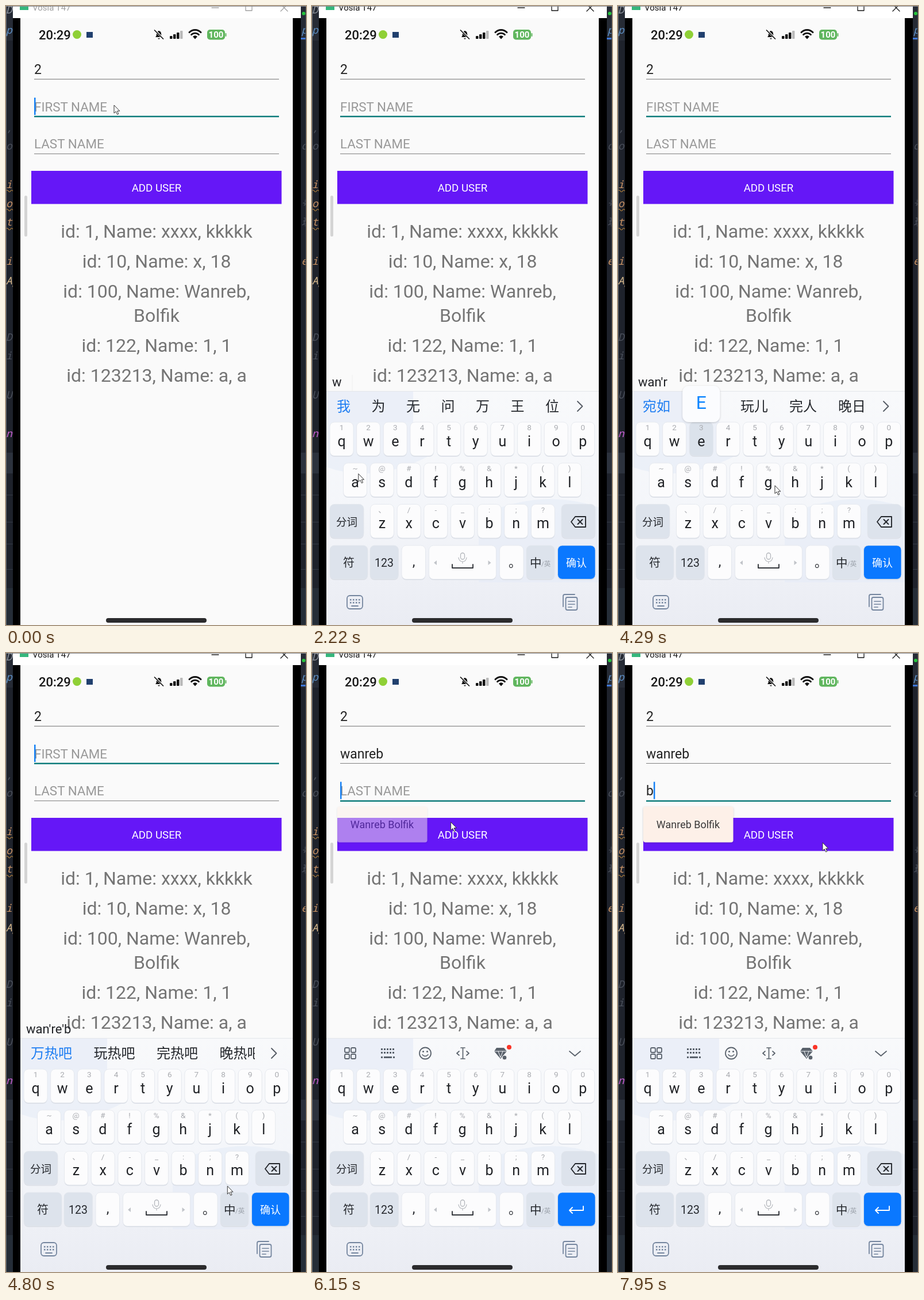
Recreate the animation shown at these times as an HTML page. Size 522 by 1074 pixels, loop 8000 ms.

```html
<!DOCTYPE html>
<html lang="en">
<head>
<meta charset="utf-8">
<title>Add user form</title>
<style>
html, body { margin: 0; width: 100%; height: 100%; overflow: hidden; background: #1e222b; }
svg { display: block; width: 100vw; height: 100vh; }
text { font-family: Roboto, "Noto Sans CJK SC", "Noto Sans CJK", sans-serif; white-space: pre; }
.code { font: italic 18px "Noto Sans Mono", monospace; }
.mid { text-anchor: middle; }
.line { fill: none; stroke-linecap: round; stroke-linejoin: round; }
</style>
</head>
<body>
<svg id="stage" viewBox="0 0 522 1074" xmlns="http://www.w3.org/2000/svg"></svg>
<script>
const LOOP = 8000;
const FIRST = 'Wanreb', LAST = 'Bolfik';

// ---------- drawing helpers ----------
const rect = (x, y, w, h, fill, more = '') =>
  `<rect x="${x}" y="${y}" width="${w}" height="${h}" fill="${fill}" ${more}/>`;
const text = (x, y, size, fill, str, more = '') =>
  `<text x="${x}" y="${y}" font-size="${size}" fill="${fill}" ${more}>${str}</text>`;
const mid = (x, y, size, fill, str, more = '') => text(x, y, size, fill, str, `class="mid" ${more}`);
const path = (d, stroke, w, more = '') =>
  `<path class="line" d="${d}" stroke="${stroke}" stroke-width="${w}" ${more}/>`;
const shape = (d, fill, more = '') => `<path d="${d}" fill="${fill}" ${more}/>`;
const dot = (x, y, r, fill, more = '') => `<circle cx="${x}" cy="${y}" r="${r}" fill="${fill}" ${more}/>`;
const group = (id, body, more = '') => `<g id="${id}" ${more}>${body}</g>`;

// ---------- editor behind the phone window ----------
function editor() {
  const gray = '#4b505b', orange = '#c99264';
  const left = [[13, 'D', '#8d939d'], [48, 'p', '#5d8fc4'], [218, ',', gray], [249, 'oi', gray],
    [316, 'ie', orange], [349, 'or', orange], [381, 'ts', orange], [449, 'ie', orange], [483, 'Ap', '#d7b98c'],
    [581, 'D', gray], [613, 'i)', gray], [681, 'Us', gray], [748, 'n', '#c65fd0']];
  const right = [[48, 'p', '#5d8fc4'], [249, 'oi', gray], [349, '号', gray], [381, '理', gray], [449, 'en', orange]];
  const wave = y => path(`M0 ${y}q2-3 4 0t4 0 4 0`, '#c08a3e', 1.2);
  return rect(0, 0, 522, 1074, '#1e222b') + rect(0, 0, 522, 60, '#262b35') +
    rect(0, 775, 522, 36, '#2c323d') + rect(0, 1010, 522, 64, '#252d37') +
    [848, 895, 933, 977].map(y => rect(0, y, 522, 1, '#343a45')).join('') +
    left.map(([y, s, c]) => text(0, y, 18, c, s, 'class="code"')).join('') +
    right.map(([y, s, c]) => text(514, y, 18, c, s, 'class="code"')).join('') +
    [321, 354, 387].map(wave).join('') +
    rect(513, 55, 9, 3, '#3f78d8') + dot(518, 13, 3, '#25c43c') +
    rect(0, 0, 1, 1074, '#666b73') + rect(521, 0, 1, 1074, '#3a3f48');
}

function titleBar() {
  return rect(12, 0, 501, 21, '#fff') + rect(24, 0, 15, 7, '#35b77c') +
    group('title', text(46, 7.5, 15, 'currentColor', 'Vosla T47') +
      path('M358 3h12M417 0v8h11V0M478 9l12-12M490 9l-12-12', 'currentColor', 1.3)) +
    rect(0, 0, 522, 1, '#8a8d92');
}

// ---------- phone screen ----------
function statusBar() {
  const bars = [5, 8, 11, 14].map((h, i) =>
    rect(285 + i * 6, 57 - h, 4.5, h, i < 3 ? '#111' : '#b9b9b9', 'rx="1"')).join('');
  const arc = (r, w) => path(`M${329 - r * .72} ${57 - r * .8}a${r} ${r} 0 0 1 ${r * 1.44} 0`, '#111', w);
  return text(57, 57.5, 22, '#161616', '20:29', 'font-weight="500"') +
    dot(123.5, 49.5, 7.5, '#8fd036') + rect(140, 45, 11, 10, '#21406e') +
    shape('M260 54q2-2 2-6 0-4 4-5 4 1 4 5 0 4 2 6zM264 56h4q-2 3-4 0z', '#111') +
    path('M259 42l15 15', '#fafafa', 3.4) + path('M258.500 42l15 15', '#111', 1.7) +
    bars + arc(14, 2.8) + arc(9, 2.8) + shape('M325 53q4-3.500 8 0l-4 4.500z', '#111') +
    rect(350, 41, 31, 17.500, '#60b65e', 'rx="5"') + rect(381.500, 47, 2, 6, '#60b65e', 'rx="1"') +
    mid(365.500, 55, 15, '#fff', '100', 'font-weight="700"');
}

function form() {
  const rows = [[402, 'id: 1, Name: xxxx, kkkkk'], [454, 'id: 10, Name: x, 18'],
    [506, `id: 100, Name: ${FIRST},`], [548, LAST], [600, 'id: 122, Name: 1, 1'], [652, 'id: 123213, Name: a, a']];
  return text(49, 118, 23, '#222', '2') + rect(49, 126.500, 426, 1, '#6e6e6e') +
    text(49, 182.500, 22.4, '#999', '', 'id="first"') + rect(49, 191, 426, 1, '#777', 'id="line1"') +
    text(49, 247, 22.4, '#999', '', 'id="last"') + rect(49, 256, 426, 1, '#888', 'id="line2"') +
    rect(49, 159, 2.500, 30, '#1480f5', 'id="caret"') +
    rect(44, 286, 435.500, 57.500, '#6517f7') + mid(262, 321.500, 18.700, '#fff', 'ADD USER') +
    rows.map(([y, s]) => mid(262, y, 32, '#757575', s)).join('') +
    rect(32, 329, 5, 71, '#d4d4d4', 'rx="2.500"') +
    group('fill', rect(44, 202, 156.500, 62, '#fdf0e8', 'rx="4" filter="url(#soft)"') +
      mid(122, 239, 18, '#3a3a3a', `${FIRST} ${LAST}`));
}

// ---------- keyboard ----------
const PITCH = 46.65;
const ROWS = [
  { x: 51.5, y: 722, keys: 'qwertyuiop', hints: '1234567890' },
  { x: 75, y: 793, keys: 'asdfghjkl', hints: '~@#!%&*()' },
  { x: 122, y: 864.5, keys: 'zxcvbnm', hints: '、/-_:;?' }
];
const keyAt = {};
ROWS.forEach(r => [...r.keys].forEach((k, i) => keyAt[k] = { x: r.x + i * PITCH, y: r.y }));

const cap = (x, y, w, fill, more = '') =>
  rect(x, y + 1, w, 59, '#d9dde5', 'rx="8"') +
  rect(x, y, w, 58.5, fill, `rx="8" stroke="#e3e6ec" stroke-width=".8" ${more}`);

function letters() {
  return ROWS.map(r => [...r.keys].map((k, i) => {
    const x = r.x + i * PITCH;
    return cap(x - 20.5, r.y, 41, '#fcfcfd', `id="key-${k}"`) +
      mid(x, r.y + 14, 13.5, '#a9abb0', r.hints[i].replace('&', '&amp;')) +
      mid(x, r.y + 41.5, 25, '#202226', k);
  }).join('')).join('');
}

function toolbar() {
  const c = '#5a626c';
  const squares = [[57, 685], [68, 685], [57, 696], [68, 696]].map(([x, y]) =>
    rect(x, y, 8, 8, 'none', `rx="2" stroke="${c}" stroke-width="1.800"`)).join('');
  let dots = rect(125, 700, 14, 3, c);
  for (let i = 0; i < 10; i++) dots += rect(120 + i % 5 * 5, 686 + (i > 4) * 6, 3, 3, c);
  dots += rect(120, 700, 3, 3, c) + rect(141, 700, 3, 3, c);
  return squares + dots +
    dot(197, 694.5, 10, 'none', `stroke="${c}" stroke-width="1.800"`) +
    dot(193.5, 691.5, 1.5, c) + dot(200.5, 691.5, 1.5, c) + path('M192 697q5 5 10 0', c, 1.7) +
    path('M259 685h7M259 704h7M262.500 685v19M256 691l-4 3.500 4 3.500M269 691l4 3.500-4 3.500', c, 1.7) +
    shape('M321 685h13l5 6-11 13-11-13z', c) + path('M317 691h22M324 691l4 11 4-11', '#f2f4f8', 1) +
    dot(335, 702, 4, c, 'stroke="#f5f6f9"') + dot(343, 684, 4, '#fa3427') +
    path('M448 691l9.500 8 9.500-8', c, 1.8);
}

function bottomRow() {
  const dim = '#dde3ec', ink = '#25282d';
  return cap(31, 864.5, 59, dim) + mid(60.5, 902, 18.5, ink, '分词') +
    cap(434, 864.5, 59, dim) + path('M458 886h18v18h-18l-7-9zM462.500 891l8 8M470.500 891l-8 8', ink, 1.9) +
    cap(31, 936, 66, dim) + mid(64, 973, 20, ink, '符') +
    cap(101, 936, 49.5, dim) + mid(125.5, 973, 19.5, ink, '123') +
    cap(156, 936, 41.5, '#fcfcfd') + mid(177, 972, 24, ink, ',') +
    cap(203.5, 936, 117, '#fcfcfd') +
    rect(258.500, 949, 7, 11, 'none', 'rx="3.500" stroke="#b4b7bc" stroke-width="1.300"') +
    path('M255 957q1 7 7 7t7-7M262 964v3', '#b4b7bc', 1.2) +
    path('M244 969v6h36v-6', '#33363b', 1.9) +
    shape('M217 962v8l-5-4zM306.500 962v8l5-4z', '#c1c4c9') +
    cap(326.5, 936, 41.5, '#fcfcfd') + text(342, 973, 22, ink, '。') +
    cap(373, 936, 49, dim) + text(379, 974, 20.5, ink, '中') + text(399, 972, 11.5, '#9ba1aa', '/英') +
    cap(427.5, 936, 65.5, '#0a78ff') + shape('M427.500 985L493 938v50q0 6-8 6.500h-50q-7 0-7.500-7z', '#077', 'opacity="0"') +
    path('M472 960v7h-24M453 962l-5 5 5 5', '#fff', 1.9, 'id="enter"') +
    mid(460, 973, 18, '#fff', '确认', 'id="confirm"');
}

function footer() {
  const c = '#75869f';
  let body = rect(61, 1023, 27, 23, 'none', `rx="5" stroke="${c}" stroke-width="1.800"`);
  for (let i = 0; i < 8; i++) body += rect(66 + i % 4 * 5, 1029 + (i > 3) * 5, 2.5, 2.5, c);
  return body + path('M69 1041h11', c, 1.8) +
    path('M437 1042V1024q0-3 3-3h17', c, 1.8) +
    rect(441.500, 1026, 20, 22, 'none', `rx="3" stroke="${c}" stroke-width="1.800"`) +
    path('M446 1033h11M446 1038h11M446 1043h6', c, 1.7);
}

function keyboard() {
  return rect(25, 668, 474, 406, 'url(#board)') + rect(25, 668, 474, 1, '#e4e6ea') +
    rect(25, 669, 151, 53, '#ebeff8') +
    shape('M25 800Q110 830 205 780V722H25zM290 885Q400 835 499 870V1000H290z', '#e6edf8', 'opacity=".65"') +
    group('tools', toolbar()) +
    group('picks', '', 'clip-path="url(#strip)"') +
    path('M462 686l8.500 8.500-8.500 8.500', '#555b64', 1.8, 'id="more"') +
    letters() + bottomRow() + footer() +
    group('compose', rect(25, 638, 50, 30, '#fafafa', 'id="composeBox"') +
      rect(75, 640, 1, 28, '#eee', 'id="composeEdge"') + text(35, 660, 22, '#202226', '', 'id="composeText"')) +
    group('bubble', rect(-32.5, -63, 65, 63, '#fbfcfe', 'rx="11" filter="url(#soft)"') +
      mid(0, -23, 32, '#0a84ff', '', 'id="bubbleText"'));
}

document.getElementById('stage').innerHTML = `<defs>
  <linearGradient id="board" x1="0" y1="0" x2="0" y2="1">
    <stop offset="0" stop-color="#f8f9fb"/><stop offset=".5" stop-color="#f4f6fa"/><stop offset="1" stop-color="#eaecf3"/>
  </linearGradient>
  <filter id="soft" x="-20%" y="-20%" width="140%" height="150%">
    <feDropShadow dx="0" dy="1" stdDeviation="1.500" flood-color="#333" flood-opacity=".25"/>
  </filter>
  <clipPath id="strip"><rect x="25" y="669" width="408" height="52"/></clipPath>
  <clipPath id="screen"><rect x="25" y="21" width="474" height="1053"/></clipPath>
</defs>` + editor() + titleBar() + rect(12, 21, 501, 1053, '#000') +
  `<g clip-path="url(#screen)">${rect(25, 21, 474, 1053, '#fafafa')}${statusBar()}${form()}${group('board-all', keyboard())}
  ${rect(174, 1062, 175, 8, '#2b2b2d', 'rx="4"')}</g>` +
  group('mouse', shape('M0 0V14L3.200 11 5.600 16.200 7.800 15.200 5.500 10.200H9.800z', '#fff', 'stroke="#333" stroke-width="1"'));

const el = {};
document.querySelectorAll('#stage [id]').forEach(n => el[n.id] = n);

// ---------- timing ----------
// The screen refreshes in bursts: [start, end, steps].
const BURSTS = [[0, 0, 1], [120, 270, 2], [660, 1620, 8], [1770, 2760, 8], [2880, 3840, 8],
  [3990, 4920, 8], [5070, 6000, 8], [6150, 7080, 8], [7200, 7950, 7]];
const TICKS = BURSTS.flatMap(([a, b, n]) =>
  Array.from({ length: n }, (_, i) => a + (n > 1 ? i * (b - a) / (n - 1) : 0)));
const snap = t => TICKS.reduce((best, k) => k <= t + 20 ? k : best, 0);

const MOUSE = [[0, 188, 172], [800, 188, 172], [1208, 191, 369], [1700, 99, 752], [1900, 99, 752],
  [2300, 77, 824], [2500, 77, 824], [3017, 360, 881], [3250, 356, 888], [3540, 193, 752], [3700, 193, 752],
  [4000, 147, 752], [4123, 147, 752], [4256, 273, 832], [4500, 308, 888], [4650, 308, 888],
  [4920, 459, 960], [5070, 459, 960], [5336, 242, 370], [5680, 236, 236], [6000, 236, 236],
  [6815, 299, 880], [6947, 301, 904], [7150, 303, 902], [7450, 459, 960], [7575, 459, 960], [7950, 356, 329]];

const HOLD = 260;
const WORDS = [
  { end: 5060, keys: [
    [1760, 'w', 'w', '我 为 无 问 万 王 位'],
    [2340, 'a', 'wa', '挖 娃 哇 瓦 袜 蛙 洼'],
    [3140, 'n', 'wan', '万 玩 完 晚 碗 弯 湾'],
    [3540, 'r', "wan'r", '宛如 万人 玩儿 完人 晚日'],
    [4110, 'e', "wan're", '万热 玩热 完热 晚热 弯热'],
    [4500, 'b', "wan're'b", '万热吧 玩热吧 完热吧 晚热吧']] },
  { end: 7570, keys: [[7070, 'b', 'b', '不 把 被 吧 本 别 比']] }
];
const COMMIT1 = WORDS[0].end, COMMIT2 = WORDS[1].end, FOCUS2 = 5860;

const clamp = v => Math.min(1, Math.max(0, v));
const ease = p => p * p * (3 - 2 * p);
const show = (node, on) => node.setAttribute('visibility', on ? 'visible' : 'hidden');
const set = (node, attrs) => Object.entries(attrs).forEach(([k, v]) => node.setAttribute(k, v));

function mouseAt(t) {
  const i = Math.max(0, MOUSE.findLastIndex(p => p[0] <= t));
  const a = MOUSE[i], b = MOUSE[i + 1] || a;
  const p = b === a ? 0 : ease((t - a[0]) / (b[0] - a[0]));
  return [a[1] + (b[1] - a[1]) * p, a[2] + (b[2] - a[2]) * p];
}

function drawField(node, line, value, hint, focused, y) {
  node.textContent = value || hint;
  set(node, { fill: value ? '#222' : '#999', 'font-size': value ? 23 : 22.4 });
  set(line, focused ? { y: y - .5, height: 2.5, fill: '#0f7d7c' } : { y, height: 1, fill: '#808080' });
}

function drawFields(t) {
  const second = t >= FOCUS2;
  const name = t >= COMMIT1 ? FIRST.toLowerCase() : '';
  const last = t >= COMMIT2 ? 'b' : '';
  drawField(el.first, el.line1, name, 'FIRST NAME', !second, 191);
  drawField(el.last, el.line2, last, 'LAST NAME', second, 256);

  const base = [COMMIT2, FOCUS2, COMMIT1].find(b => t >= b) || 620;
  const field = second ? el.last : el.first;
  const typed = second ? last : name;
  set(el.caret, { x: 49 + (typed ? field.getComputedTextLength() : 0), y: second ? 223.5 : 159 });
  show(el.caret, (t - base + 1000) % 1000 < 500);

  const fade = second ? clamp((t - 6000) / 310) : clamp((t - 5070) / 310);
  set(el.fill, { opacity: fade, transform: `translate(0 ${second ? 64.5 : 0})` });
}

let lastPicks = null;
function drawKeys(t) {
  const word = WORDS.find(w => t < w.end && t >= w.keys[0][0]);
  const press = word && word.keys.find(([at]) => t >= at && t < at + HOLD);
  const step = word && word.keys.findLast(([at]) => t >= at + HOLD);

  Object.keys(keyAt).forEach(k => el['key-' + k].setAttribute('fill', press && press[1] === k ? '#dbe2eb' : '#fcfcfd'));
  show(el.bubble, press);
  if (press) {
    const { x, y } = keyAt[press[1]];
    set(el.bubble, { transform: `translate(${x} ${y})` });
    el.bubbleText.textContent = press[1].toUpperCase();
  }

  show(el.tools, !step);
  show(el.enter, !step);
  [el.confirm, el.more, el.picks, el.compose].forEach(n => show(n, step));
  const picks = step ? step[3] : '';
  if (picks !== lastPicks) {
    lastPicks = picks;
    const list = picks.split(' ');
    const gap = list[0].length * 24.5 + 36;
    el.picks.innerHTML = list.map((s, i) =>
      text(43 + i * gap, 703, 24, i ? '#24272c' : '#1d7df2', s)).join('');
  }
  if (step) {
    el.composeText.textContent = step[2];
    const w = el.composeText.getComputedTextLength() + 28;
    set(el.composeBox, { width: Math.min(w, 78) });
    set(el.composeEdge, { x: 25 + w });
    show(el.composeEdge, w < 78);
  } else show(el.composeEdge, false);
}

function draw(time) {
  const t = snap(time);
  el.title.style.color = t < 660 ? '#a0a0a0' : '#161616';
  const rise = ease(clamp((t - 700) / 380));
  set(el['board-all'], { transform: `translate(0 ${(1 - rise) * 406})` });
  show(el['board-all'], rise > 0);
  drawFields(t);
  drawKeys(t);
  // Nothing of the keyboard may stay visible before it rises.
  el['board-all'].style.display = rise > 0 ? '' : 'none';
  const [x, y] = mouseAt(t);
  set(el.mouse, { transform: `translate(${x} ${y})` });
}

const start = performance.now();
function tick() {
  draw((performance.now() - start) % LOOP);
  requestAnimationFrame(tick);
}
tick();
</script>
</body>
</html>
```
